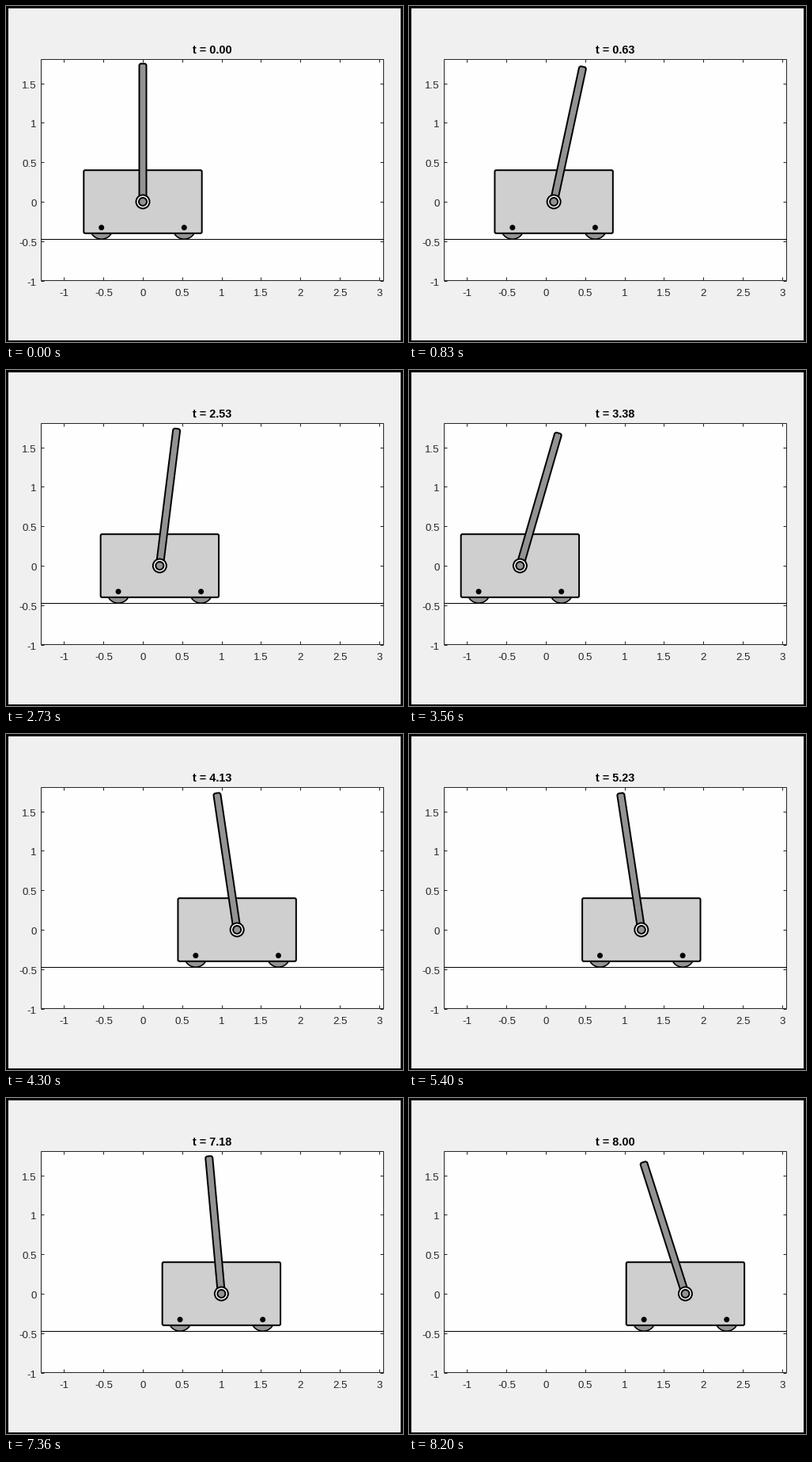
Write a matplotlib script that moves like this. It is 502 by 424 pixels and loops after 9560 ms.

```python
import numpy as np
import matplotlib.pyplot as plt
from matplotlib.animation import FuncAnimation
from matplotlib.collections import LineCollection
from matplotlib.patches import Circle, FancyBboxPatch, Rectangle
from matplotlib.transforms import Affine2D

W, H, DPI = 502, 424, 128
PT = 72 / DPI                       # points per pixel
X0, Y0, S = 173.0, 247.0, 99.6      # world zero and pixels per unit
LEFT, RIGHT, TOP, BOTTOM, GROUND = 44, 477, 67, 346, 294   # snapped to pixel centres
INK, GREY = "#262626", "#939393"
STEP, LOOP = 20, 9560               # ms

plt.rcParams["font.family"] = "Liberation Sans"
fig = plt.figure(figsize=(W / DPI, H / DPI), dpi=DPI, facecolor="black")
ax = fig.add_axes([0, 0, 1, 1])
ax.set_xlim(0, W)
ax.set_ylim(H, 0)
ax.axis("off")

# Cart-pole motion: steady swing plus a decaying start from rest.
G, ARM, OMEGA, DECAY = 9.81, 1.089, 2.0, 3.66
MID, SWING, PHASE = 0.676, 0.807, -9.368


def start_poly():
    """Polynomial that cancels the steady swing's first derivatives at t = 0."""
    c, s = np.cos(PHASE), np.sin(PHASE)
    p = [-(MID + SWING * c), SWING * OMEGA * s,
         SWING * OMEGA**2 * c, -SWING * OMEGA**3 * s]
    a = DECAY
    return np.polynomial.Polynomial([
        p[0],
        p[1] + a * p[0],
        (p[2] + 2 * a * p[1] + a**2 * p[0]) / 2,
        (p[3] + 3 * a * p[2] + 3 * a**2 * p[1] + a**3 * p[0]) / 6])


Q = start_poly()
Q1, Q2 = Q.deriv(), Q.deriv(2)


def pose(t):
    """Cart position and pole angle at time t."""
    swing = SWING * np.cos(OMEGA * t + PHASE)
    fade = np.exp(-DECAY * t)
    y = MID + swing + fade * Q(t)
    acc = -OMEGA**2 * swing + fade * (Q2(t) - 2 * DECAY * Q1(t) + DECAY**2 * Q(t))
    return y - ARM / G * acc, acc / G


def clock(ms):
    return min(max(0.05 * (ms // 50) - 0.17, 0.0), 8.0)


def label(x, y, text, size, **kw):
    return ax.text(x, y, text, fontsize=size * PT, va="baseline", **kw)


def draw_axes():
    ax.add_patch(Rectangle((3, 3), W - 6, H - 5, fc="#f0f0f0", lw=0))
    ax.add_patch(Rectangle((LEFT, TOP), RIGHT - LEFT, BOTTOM - TOP,
                           fc="#fefefe", ec=INK, lw=PT))
    ticks = []
    for v in np.arange(-1, 3.1, 0.5):
        x = X0 + S * v
        ticks += [[(x, BOTTOM), (x, BOTTOM - 4)], [(x, TOP), (x, TOP + 4)]]
        label(x + 0.2, 366, f"{v:g}", 13.33, ha="center", color=INK)
    for v in np.arange(-1, 1.6, 0.5):
        y = Y0 - S * v
        ticks += [[(LEFT, y), (LEFT + 4, y)], [(RIGHT, y), (RIGHT - 4, y)]]
        label(38.8, y + 6, f"{v:g}", 13.33, ha="right", color=INK)
    ax.add_collection(LineCollection(ticks, colors=INK, linewidths=PT))
    ax.plot([LEFT, RIGHT], [GROUND, GROUND], color="black", lw=PT, zorder=2)


cart, pole = Affine2D(), Affine2D()


def part(patch, frame, z, fc, lw=2.0):
    patch.set(facecolor=fc, edgecolor="black", linewidth=lw * PT, zorder=z)
    patch.set_transform(frame + ax.transData)
    ax.add_patch(patch)


def slab(x, y, w, h, r):
    return FancyBboxPatch((x, y), w, h, boxstyle=f"round,pad=0,rounding_size={r}")


def draw_cart():
    for x in (-52.3, 52.3):
        part(Circle((x, 32.6), 14.6), cart, 3, GREY, 1.6)
        part(Circle((x, 32.6), 3.5), cart, 5, "black", 0)
    part(slab(-74.7, -39.8, 149.4, 79.6, 1.8), cart, 4, "#cfcfcf")
    part(slab(-4.5, -174.3, 9, 178.8, 2.6), pole, 6, GREY)
    part(Circle((0, 0), 8.5), cart, 7, "white")
    part(Circle((0, 0), 5.0), cart, 8, GREY)


draw_axes()
draw_cart()
title = label(260.7, 60, "", 14.4, ha="center", weight="bold", color="black")


def update(i):
    t = clock(i * STEP)
    x, angle = pose(t)
    cart.clear().translate(X0 + S * x, Y0)
    pole.clear().rotate(angle).translate(X0 + S * x, Y0)
    title.set_text(f"t = {t:.2f}")
    return []


anim = FuncAnimation(fig, update, frames=LOOP // STEP, interval=STEP,
                     init_func=lambda: update(0), repeat=True, repeat_delay=0)
plt.show()
```
